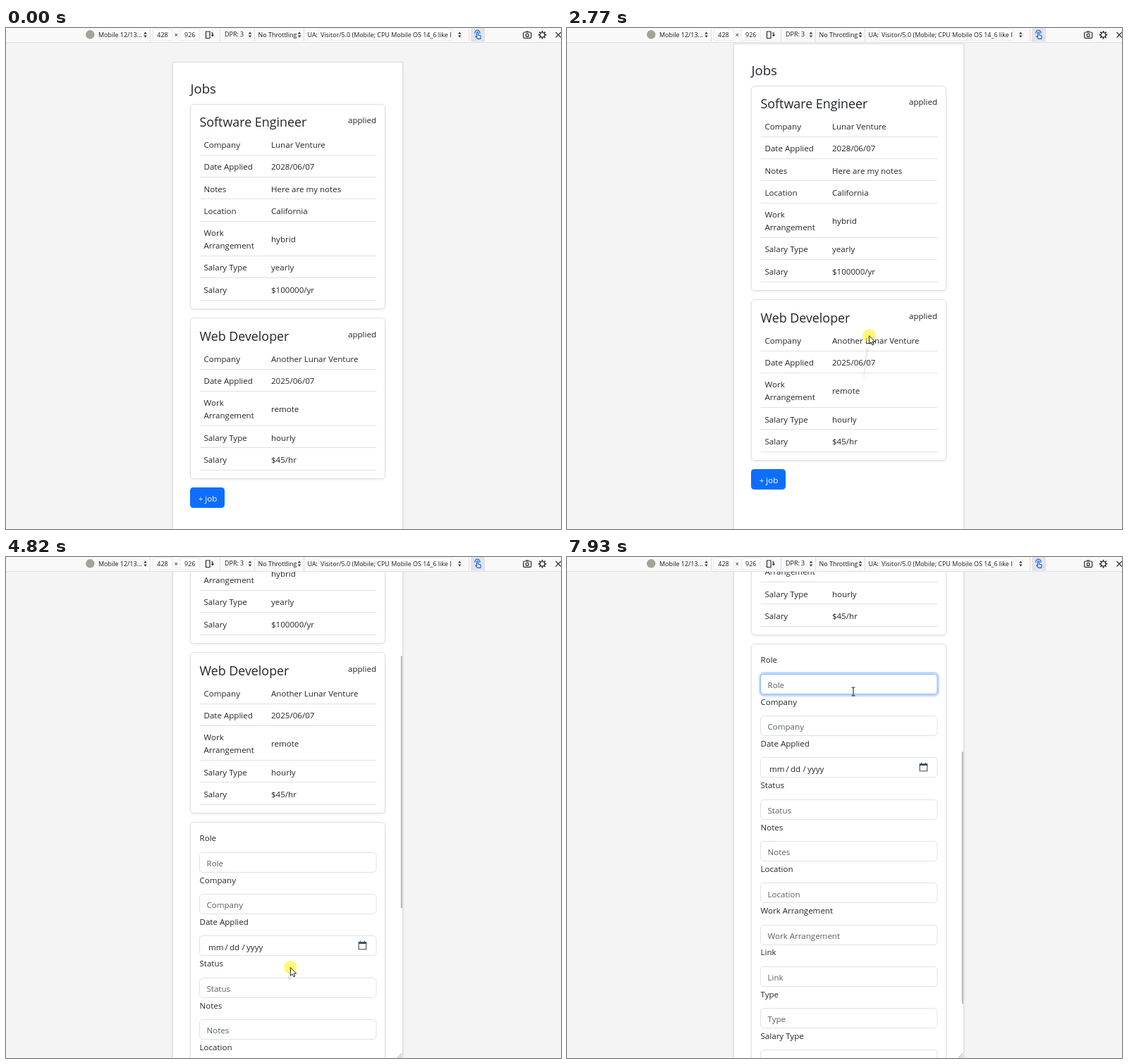
Write an HTML page that moves like this. It is 787 px wide and 711 px high and loops after 8 s.

```html
<!DOCTYPE html>
<html lang="en">
<head>
<meta charset="utf-8">
<title>Job list</title>
<style>
html, body { margin: 0; width: 100%; height: 100%; overflow: hidden; background: #f4f4f5; }
svg { display: block; }
text { font: 11.57px "Open Sans", "Noto Sans", sans-serif; fill: #212529; white-space: pre; }
.h { font-size: 17.85px; }
.h1 { font-size: 18.6px; }
.hint { fill: #595f64; }
.btn { fill: #fff; text-anchor: middle; }
.end { text-anchor: end; }
.mid { text-anchor: middle; }
.bar text { font-size: 8.95px; fill: #18181a; }
.card { fill: #fff; stroke: #dee0e2; filter: drop-shadow(0 1.5px 1.5px rgba(0,0,0,.09)); }
.field { fill: #fff; stroke: #dee2e6; }
.rule { stroke: #dee2e6; }
.line { fill: none; stroke: #2b2b33; stroke-width: 1.2; }
</style>
</head>
<body>
<svg id="stage" width="787" height="711" viewBox="0 0 787 711"></svg>
<script>
const LOOP = 8000, ROW = 31.21, LINE = 18.29, STEP = 59.3, FIELD_Y = 695.2, PAGE_STOP = 39;
const POINTER_AT = 270, FORM_AT = 3390, FOCUS_AT = 7080, CARET_OFF = 7930;

const text = (x, y, s, cls = '') => `<text x="${x}" y="${y}" class="${cls}">${s}</text>`;
const box = (x, y, w, h, r, attrs) =>
  `<rect x="${x}" y="${y}" width="${w}" height="${h}" rx="${r}" ${attrs}/>`;
const path = (d, attrs) => `<path d="${d}" ${attrs}/>`;
const crisp = v => Math.floor(v) + .5;

function jobCard(top, height, title, rows) {
  let y = top + 40.85;
  let out = box(261.5, crisp(top - .5), 276, height, 4.6, 'class="card"') +
    text(274.5, top + 31.6, title, 'h') + text(525, top + 26.8, 'applied', 'end');
  for (const [label, value] of rows) {
    const parts = label.split('|');
    const extra = (parts.length - 1) * LINE;
    parts.forEach((p, i) => out += text(280.5, y + 20.8 + i * LINE, p));
    out += text(376, y + 20.8 + extra / 2, value);
    y += ROW + extra;
    out += path(`M274.5 ${crisp(y)}H525.5`, 'class="rule"');
  }
  return out;
}

const button = (y, w, label) =>
  box(261, y, w, 29, 4.6, 'fill="#0d6efd"') + text(261.5 + w / 2, y + 19.8, label, 'btn');

function dateField(y) {
  const parts = [[287, 'mm'], [310.5, '/'], [317, 'dd'], [334.5, '/'], [341, 'yyyy']];
  return parts.map(([x, s]) => text(x, y + 19.8, s)).join('') +
    path(`M500.2 ${y + 9}h10.6v10h-10.6zM502.5 ${y + 7}v2M508.5 ${y + 7}v2`,
      'fill="none" stroke="#3b4a58" stroke-width="1.1"') +
    path(`M500 ${y + 10.1}h11`, 'stroke="#3b4a58" stroke-width="2.2"');
}

function formCard() {
  const names = ['Role', 'Company', 'Date Applied', 'Status', 'Notes', 'Location',
    'Work Arrangement', 'Link', 'Type', 'Salary Type', 'Salary'];
  let out = box(261.5, 652.5, 276, 677, 4.6, 'class="card"') +
    box(273.5, 693.5, 253, 32, 6, 'id="ring" fill="none" stroke="#0d6efd" stroke-width="3"');
  names.forEach((name, i) => {
    const y = FIELD_Y + i * STEP;
    out += text(274.5, y - 15.9, name);
    out += box(274.5, crisp(y), 250.5, 28, 4.6, 'class="field"' + (i ? '' : ' id="role"'));
    out += i === 2 ? dateField(y) : text(284.5, y + 19.8, name, 'hint');
  });
  return out + button(1342, 45, 'Save') +
    path(`M284.5 ${FIELD_Y + 7}v16`, 'id="caret" stroke="#212529"');
}

const spinner = x =>
  path(`M${x - 2.3} 8.4l2.3-2.8 2.3 2.8zM${x - 2.3} 10.6l2.3 2.8 2.3-2.8z`, 'fill="#38383d"');

function toolbar() {
  const field = (x, w) => box(x + .5, 1.5, w, 16, 1, 'fill="#fff" stroke="#ebebee"');
  const teeth = [...Array(8)].map((_, i) =>
    `<path d="M760.5 4v2.4" transform="rotate(${i * 45} 760.5 9.8)" stroke="#2b2b33" stroke-width="1.8"/>`).join('');
  return '<g class="bar">' +
    box(0, 0, 787, 20, 0, 'fill="#f9f9fa"') + box(0, 20, 787, 1, 0, 'fill="#e0e0e2"') +
    [204.5, 303.5, 352.5, 422.5, 656.5].map(x => path(`M${x} 1V19`, 'stroke="#e0e0e2"')).join('') +
    '<circle cx="119.3" cy="9.3" r="6.2" fill="#a3a39a"/>' +
    text(131, 12.9, 'Mobile 12/13...') + spinner(197.5) +
    field(208, 27) + text(222, 12.9, '428', 'mid') + text(241.2, 12.9, '×', 'mid') +
    field(247, 27) + text(260.7, 12.9, '926', 'mid') +
    path('M283.5 5h5.5v9.5h-5.5zM291 7h2v4M291.3 9.6l1.7 1.7 1.4-1.7', 'class="line"') +
    text(310, 12.4, 'DPR: 3') + spinner(346) +
    text(357.5, 12.9, 'No Throttling') + spinner(416) +
    text(427.5, 12.9, 'UA:') + field(443, 189) +
    '<g clip-path="url(#ua)">' +
    text(446, 12.9, 'Visitor/5.0 (Mobile; CPU Mobile OS 14_6 like Desk') + '</g>' + spinner(643.3) +
    box(659, 0, 20, 19.5, 1, 'fill="#e3e3e8"') +
    path('M667.5 12V6.2q1-1.4 2 0V10l3 .8q1 .4.8 1.6l-.6 3h-4l-3-3.4q.4-1 1.8 0zM665.2 8a3.5 3.5 0 1 1 6.4 0',
      'fill="none" stroke="#0a63e0" stroke-width="1.1"') +
    box(733.6, 6, 11, 8.4, 1.4, 'class="line"') + path('M737 5h4', 'class="line"') +
    '<circle cx="739.1" cy="10.2" r="2" class="line"/>' +
    teeth + '<circle cx="760.5" cy="9.8" r="3.3" class="line"/>' +
    path('M779.5 6l7.5 7.5M787 6l-7.5 7.5', 'class="line"') + '</g>';
}

const stage = document.getElementById('stage');
stage.innerHTML =
  '<defs><clipPath id="ua"><rect x="444" y="0" width="187" height="20"/></clipPath></defs>' +
  box(0, 0, 787, 711, 0, 'fill="#f4f4f5"') +
  '<g id="page">' +
  box(236.5, 48.5, 326, 705.5, 0, 'fill="#fff" stroke="#dfdfe1" style="filter:drop-shadow(0 1px 1.5px rgba(0,0,0,.1))"') +
  '<g id="content">' + text(261.5, 92.5, 'Jobs', 'h1') +
  jobCard(108.5, 290, 'Software Engineer', [
    ['Company', 'Lunar Venture'], ['Date Applied', '2028/06/07'], ['Notes', 'Here are my notes'],
    ['Location', 'California'], ['Work|Arrangement', 'hybrid'], ['Salary Type', 'yearly'],
    ['Salary', '$100000/yr']]) +
  jobCard(412, 228, 'Web Developer', [
    ['Company', 'Another Lunar Venture'], ['Date Applied', '2025/06/07'],
    ['Work|Arrangement', 'remote'], ['Salary Type', 'hourly'], ['Salary', '$45/hr']]) +
  '<g id="add">' + button(652, 49, '+ job') + '</g><g id="form">' + formCard() + '</g></g>' +
  path('M552.5 752.5l9-9M555.5 752.5l6-6M558.5 752.5l3-3', 'stroke="#9a9aa0"') + '</g>' +
  box(559.8, 0, 2.2, 358, 1, 'id="thumb" fill="#bcbcbe"') +
  toolbar() +
  '<g id="trail" stroke="#000" stroke-opacity=".06"></g>' +
  '<g id="pointer"><circle id="press" r="9.2" cx=".3" cy="-.3" fill="#fff200" fill-opacity=".55"/>' +
  path('M.5 0V11.7L3.2 9.2 5 13.3 6.9 12.5 5.1 8.5H8.8Z', 'id="arrow" fill="#fff" stroke="#111" stroke-width=".9"') +
  path('M-2.5-5.5H-.8L0-4.8.8-5.5H2.5M0-5V6M-2.5 6.5H-.8L0 5.8.8 6.5H2.5', 'id="beam" fill="none" stroke="#111"') +
  '</g>';

// Gestures: the pointer eases to (x, y); a drag also eases the scroll position.
const move = (from, to, x, y, more) => ({ from, to, x, y, ...more });
const drag = (from, to, x, y, scroll, more) => ({ from, to, x, y, scroll, drag: true, ...more });
const gestures = [
  move(POINTER_AT, 630, 697, 373),
  move(910, 1650, 430, 430),
  drag(1750, 1912, 438, 294, 54),
  drag(2050, 2430, 425, 450, 0),
  move(2440, 2560, 418, 520),
  drag(2570, 2898, 433, 395, PAGE_STOP),
  move(2960, 3370, 294, 640, { click: true }),
  move(3710, 3890, 362, 640),
  drag(3900, 4400, 377, 405, 259, { beam: true }),
  move(4520, 4740, 402, 600),
  drag(4760, 5100, 412, 395, 464),
  move(5130, 5310, 420, 575),
  drag(5370, 5580, 420, 424, 680),
  drag(5690, 5950, 425, 505, 605),
  move(5960, 6160, 415, 285),
  drag(6180, 6500, 410, 361, 529),
  move(6520, 6980, 408, 204),
  move(7000, FOCUS_AT, 406, 190.5, { click: true, beam: true })];

const clamp = v => Math.min(1, Math.max(0, v));
const ease = u => u * u * (3 - 2 * u);

function stateAt(t) {
  const s = { x: 758, y: 705, scroll: 0, pressed: false, beam: false };
  for (const g of gestures) {
    if (t < g.from) break;
    const k = ease(clamp((t - g.from) / (g.to - g.from))), done = t >= g.to;
    for (const key of ['x', 'y', 'scroll']) s[key] += ((g[key] ?? s[key]) - s[key]) * k;
    s.pressed = g.drag ? !done : !!g.click && done && t < g.to + 80;
    s.beam = !!g.beam && done;
  }
  return s;
}

function trail(t) {
  let out = '';
  for (let age = 30; age < 110; age += 10) {
    const a = stateAt(t - age), b = stateAt(t - age - 10);
    out += path(`M${a.x} ${a.y}L${b.x} ${b.y}`, `stroke-width="${6 - age / 24}"`);
  }
  return out;
}

const el = {};
for (const node of stage.querySelectorAll('[id]')) el[node.id] = node;
const show = (node, on) => node.setAttribute('visibility', on ? 'visible' : 'hidden');
const shift = (node, x, y) => node.setAttribute('transform', `translate(${x} ${y})`);

function draw(t) {
  const s = stateAt(t), open = t >= FORM_AT, seen = t >= POINTER_AT;
  const page = open ? PAGE_STOP : s.scroll, inner = s.scroll - page;
  shift(el.page, 0, -Math.round(page));
  shift(el.content, 0, -Math.round(inner));
  show(el.add, !open);
  show(el.form, open);
  show(el.thumb, inner > 0);
  el.thumb.setAttribute('y', 12.6 + .538 * inner);

  const glow = clamp((t - FOCUS_AT) / 150);
  el.ring.setAttribute('stroke-opacity', .25 * glow);
  el.role.style.stroke = glow ? '#86b7fe' : '';
  show(el.caret, t >= FOCUS_AT && t < CARET_OFF);

  shift(el.pointer, s.x, s.y);
  show(el.press, seen && s.pressed);
  show(el.arrow, seen && !s.beam);
  show(el.beam, seen && s.beam);
  el.trail.innerHTML = s.pressed ? trail(t) : '';
}

function frame() {
  draw(performance.now() % LOOP);
  requestAnimationFrame(frame);
}
frame();
</script>
</body>
</html>
```
